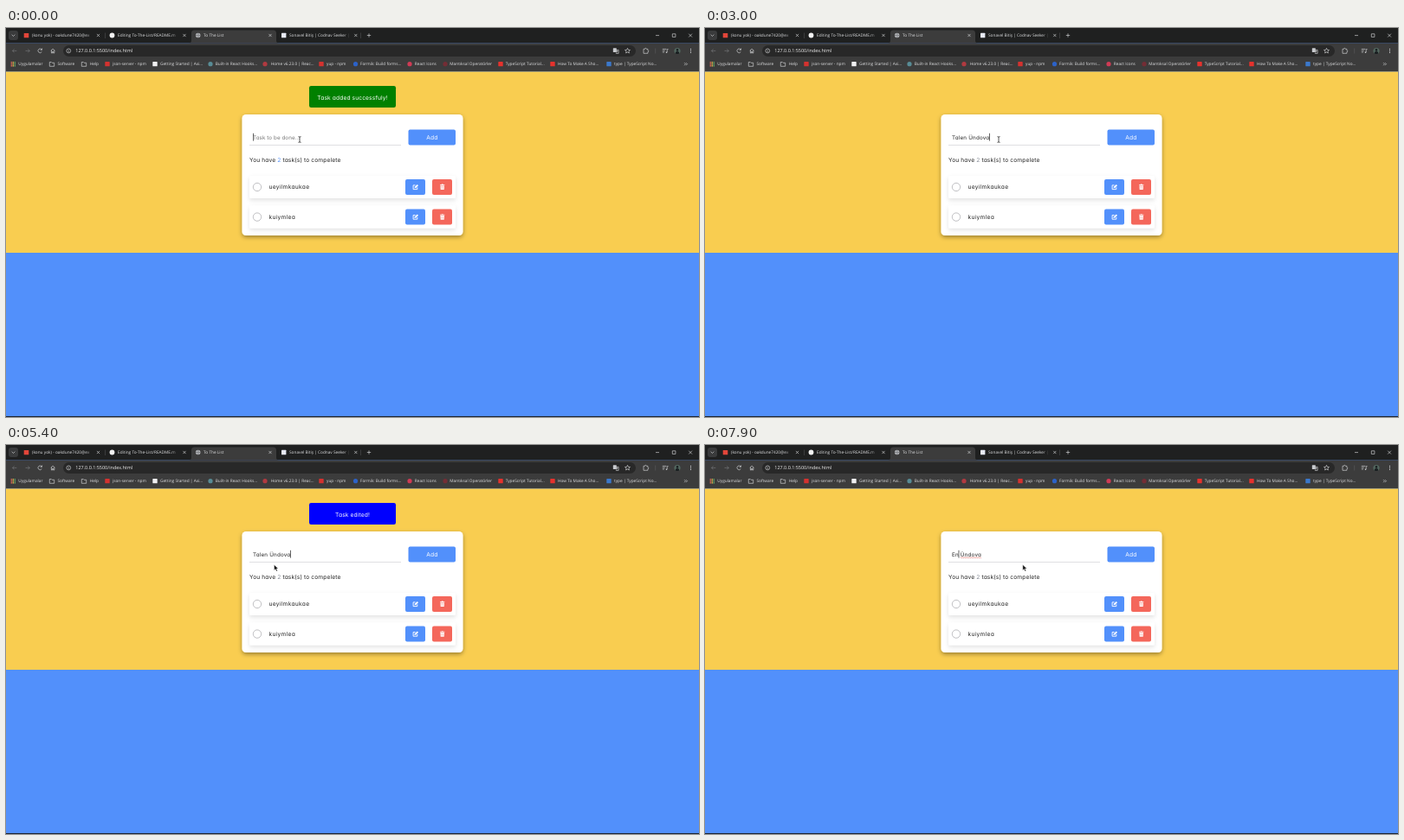
Recreate the animation shown at these times as an HTML page. Size 800 by 450 pixels, loop 8 s.

```html
<!DOCTYPE html>
<html lang="en">
<head>
<meta charset="utf-8">
<title>To The List</title>
<style>
html, body { margin: 0; width: 100%; height: 100%; overflow: hidden; background: #5290fb; }
svg { display: block; width: 100vw; height: 100vh; }
text { white-space: pre; text-rendering: geometricPrecision; }
.ui { font: 4.75px "Open Sans", "Noto Sans", sans-serif; fill: #dedfe1; }
.url { font-size: 5.45px; fill: #f0f0f0; }
.page { font: 6.67px Inter, "Open Sans", sans-serif; font-feature-settings: "cv11"; letter-spacing: .12px; fill: #252525; }
.item { letter-spacing: .28px; }
.field { font-size: 6.25px; letter-spacing: .2px; }
.hint { letter-spacing: .08px; fill: #777; }
.light { fill: #fff; }
.line { fill: none; stroke: #d6d7d9; stroke-width: .65; }
</style>
</head>
<body>
<svg id="stage" viewBox="0 0 800 450" preserveAspectRatio="none">
  <defs>
    <filter id="cardShadow" x="-10%" y="-10%" width="120%" height="125%">
      <feDropShadow dx="0" dy="2" stdDeviation="2.6" flood-color="#000" flood-opacity=".38"/>
    </filter>
    <filter id="rowShadow" x="-10%" y="-40%" width="120%" height="200%">
      <feDropShadow dx="0" dy="2.5" stdDeviation="2.6" flood-color="#000" flood-opacity=".11"/>
    </filter>
    <linearGradient id="fadeTab"><stop offset="0" stop-color="#1f2020" stop-opacity="0"/><stop offset="1" stop-color="#1f2020"/></linearGradient>
  </defs>
  <g id="browser"></g>
  <g id="page"></g>
</svg>
<script>
const LOOP = 8000, STEP = 100, BLUE = '#5290fb', RED = '#f4675b';
const TASK = 'Talen Ündova', SURNAME = ' Ündova';
const FIELD_X = 285;

const $ = id => document.getElementById(id);
function add(parent, tag, attrs = {}, text) {
  const el = document.createElementNS('http://www.w3.org/2000/svg', tag);
  for (const k in attrs) el.setAttribute(k, attrs[k]);
  if (text !== undefined) el.textContent = text;
  parent.appendChild(el);
  return el;
}
const box = (p, x, y, width, height, fill, rx = 0, more = {}) =>
  add(p, 'rect', { x, y, width, height, fill, rx, ...more });
const dot = (p, cx, cy, r, fill, more = {}) => add(p, 'circle', { cx, cy, r, fill, ...more });
const label = (p, x, y, str, cls, more = {}) => add(p, 'text', { x, y, class: cls, ...more }, str);
const line = (p, d, more = {}) => add(p, 'path', { d, class: 'line', ...more });
const show = (el, on) => el.setAttribute('visibility', on ? 'visible' : 'hidden');

function globe(p, x, y, r) {
  dot(p, x, y, r, '#c4c6c9');
  line(p, `M${x - r} ${y}h${2 * r}M${x} ${y - r}q${-r} ${r} 0 ${2 * r}q${r} ${-r} 0 ${-2 * r}`,
    { style: 'stroke:#55575b;stroke-width:.5' });
}

function drawTabs(g) {
  box(g, 0, 0, 800, 17.5, '#1f2020');
  box(g, 3, 3, 11, 11, '#3a3b3c', 3);
  line(g, 'M6.7 7.7l1.8 1.8l1.8-1.8');
  add(g, 'path', { d: 'M211 17.5q3 0 3-3V6q0-3.5 3.5-3.5h91q3.5 0 3.5 3.5v8.5q0 3 3 3z', fill: '#3c3c3c' });
  line(g, 'M114.5 5.5v6.5M409.5 5.5v6.5', { style: 'stroke:#4b4c4e' });

  box(g, 20.7, 6, 5.6, 5.2, '#e2463a', .5);
  dot(g, 122.5, 8.5, 2.9, '#f2f2f2');
  globe(g, 221.7, 8.5, 2.7);
  box(g, 318, 5.8, 5.4, 5.4, '#e8ebf6', .5);
  const tabs = [
    [30, '(konu yok) - oakdune7420@ex', 106.5],
    [129, 'Editing To-The-List/README.m', 206],
    [228, 'To The List', 305],
    [327, 'Sonavel Bitiş | Codnav Seeker | U', 403.8]
  ];
  tabs.forEach(([x, str, close], i) => {
    label(g, x, 10.3, str, 'ui');
    if (i !== 2) {
      box(g, x + 62, 4, 9, 9, 'url(#fadeTab)');
      box(g, x + 71, 4, 10, 9, '#1f2020');
    }
    line(g, `M${close - 1.6} 6.9l3.2 3.2m0-3.2l-3.2 3.2`);
  });
  line(g, 'M419 6.3v4.4M416.8 8.5h4.4');
  line(g, 'M750 8.6h4M769.3 6.8h3.6v3.6h-3.6zM788.2 6.7l3.8 3.8m0-3.8l-3.8 3.8');
}

function drawToolbar(g) {
  box(g, 0, 17.5, 800, 33, '#3c3c3c');
  box(g, 66, 20, 661, 13, '#282828', 6.5);
  line(g, 'M12.3 26.4h-4.8m2-2l-2 2l2 2M22.5 26.4h4.8m-2-2l2 2l-2 2', { style: 'stroke:#77797c' });
  line(g, 'M41.2 25a2.3 2.3 0 1 0 .1 2.5M41.5 23.5v1.8h-1.8');
  line(g, 'M51.8 26.2l2.3-2l2.3 2M52.4 25.8v3.2h1.2v-1.8h1v1.8h1.2v-3.2');
  dot(g, 72.3, 26.4, 2.4, 'none', { class: 'line' });
  line(g, 'M72.3 26v1.7M72.3 24.8v.5');
  label(g, 80.3, 28.3, '127.0.0.1:5500/index.html', 'ui url');

  box(g, 700.8, 23.3, 4, 4.6, '#c8cacd', .5);
  line(g, 'M703.5 25.4h3.6v4h-3.2M704.6 27h1.8m-.9-.6v.6q-.3 1-1 1.4');
  line(g, 'M717.5 23.4l.9 1.9l2.1.2l-1.6 1.4l.5 2.1l-1.9-1.1l-1.9 1.1l.5-2.1l-1.6-1.4l2.1-.2z');
  line(g, 'M736 24.3h1.5a.9 .9 0 0 1 1.8 0h1.6v1.6a.9 .9 0 0 1 0 1.8v1.6h-4.9z');
  line(g, 'M749.7 23.5v6', { style: 'stroke:#5a5b5e' });
  line(g, 'M757.8 24.4h4.6M757.8 26.2h3M757.8 28h2.2M763.2 28v-3.4h1.4');
  dot(g, 762.5, 28.2, .8, '#d6d7d9');
  dot(g, 775, 26.5, 3.6, '#53675f');
  add(g, 'path', { d: 'M772.6 29.2q.2-2.3 2.4-2.3t2.4 2.3q-2.4 1.8-4.8 0z', fill: '#191e20' });
  dot(g, 775, 25.4, 1.3, '#191e20');
  for (const y of [24.4, 26.4, 28.4]) dot(g, 790.5, y, .55, '#d6d7d9');
}

function drawBookmarks(g) {
  const gridColors = ['#e8675a', '#f0c04c', '#63ae6b'];
  for (let i = 0; i < 9; i++)
    box(g, 5.6 + i % 3 * 2, 39.1 + (i / 3 | 0) * 2, 1.4, 1.4, gridColors[i % 3]);
  const marks = [
    [8, 14.3, 'Uygulamalar'],
    [53, 59.5, 'Software', 'folder'],
    [90, 96.7, 'Help', 'folder'],
    [117, 123, 'json-server - npm', 'square', '#d4322f'],
    [172, 178, 'Getting Started | Axi...', 'square', '#f0f0f2'],
    [236, 241.8, 'Built-in React Hooks...', 'circle', '#588c96'],
    [299, 305.7, 'Home v6.23.0 | Reac...', 'circle', '#b13a40'],
    [364, 370, 'yup - npm', 'square', '#d4322f'],
    [403.5, 409, 'Formik: Build forms...', 'circle', '#2c62c8'],
    [466, 471.8, 'React Icons', 'circle', '#d03b55'],
    [507, 512.3, 'Mantıksal Operatörler', 'circle', '#742d35'],
    [571, 576.7, 'TypeScript Tutorial...', 'square', '#e5322d'],
    [631, 637, 'How To Make A Sho...', 'square', '#e5322d'],
    [696, 702, 'type | TypeScript No...', 'square', '#3b78cb']
  ];
  for (const [ix, x, str, kind, color] of marks) {
    if (kind === 'folder') line(g, `M${ix - 2.7} 39.5h2l.8 .8h2.6v4h-5.4z`);
    if (kind === 'square') box(g, ix - 2.7, 39.1, 5.4, 5.2, color, .6);
    if (kind === 'circle') dot(g, ix, 41.7, 2.6, color);
    label(g, x, 43.4, str, 'ui');
  }
  line(g, 'M783 40.2l1.5 1.5l-1.5 1.5M785 40.2l1.5 1.5l-1.5 1.5');
}

function drawRow(p, i, str) {
  const g = add(p, 'g', { transform: `translate(0 ${i * 34.6})` });
  box(g, 281, 171, 238, 26, '#fff', 2, { filter: 'url(#rowShadow)' });
  dot(g, 290, 184, 4.7, '#fff', { stroke: '#b9b9bd', 'stroke-width': .9 });
  label(g, 303.5, 186.3, str, 'page item');
  box(g, 461, 175, 23, 18, BLUE, 2);
  box(g, 492, 175, 23, 18, RED, 2);
  line(g, 'M472.6 181.9h-2.5v4.7h4.7v-2.3', { style: 'stroke:#fff;stroke-width:.9' });
  add(g, 'path', { d: 'M471.6 185.3l.3-1.6l2.8-2.8l1.3 1.3l-2.8 2.8z', fill: '#fff' });
  add(g, 'path', { d: 'M501 181.2h1.5l.5-.6h1.4l.5 .6h1.5v.8h-5.4zM501.4 182.4h4.6l-.3 4.7h-4z', fill: '#fff' });
  line(g, 'M502.8 183.3v2.8M504.6 183.3v2.8', { style: `stroke:${RED};stroke-width:.4` });
  return g;
}

drawTabs($('browser'));
drawToolbar($('browser'));
drawBookmarks($('browser'));

const page = $('page');
box(page, 0, 50.5, 800, 209.5, '#f9cd50');
box(page, 0, 260, 800, 189, BLUE);
box(page, 0, 449, 800, 1, '#1c2431');

const toast = add(page, 'g');
const toastBox = box(toast, 350, 67, 100, 25, '#008000', 2.2);
const toastText = label(toast, 400, 83, '', 'page light', { 'text-anchor': 'middle' });

const card = box(page, 272.5, 100, 255, 140, '#fff', 4.5, { filter: 'url(#cardShadow)' });
box(page, 281, 135, 175, .7, '#d2d2d6');
box(page, 464.5, 117.5, 54.5, 18, BLUE, 2);
label(page, 491.8, 129, 'Add', 'page light', { 'text-anchor': 'middle' });

const info = label(page, 281, 155.3, 'You have ', 'page');
const count = add(info, 'tspan', {}, '2');
add(info, 'tspan', {}, ' task(s) to compelete');

drawRow(page, 0, 'ueyilmkaukae');
drawRow(page, 1, 'kuiymlea');
const thirdRow = drawRow(page, 2, TASK);

const hint = label(page, FIELD_X, 128.5, 'Task to be done...', 'page field hint');
const mark = box(page, 0, 121.5, 0, 9.4, '#2a6bd2');
const field = label(page, FIELD_X, 128.5, '', 'page field');
const parts = ['#252525', '#fff', '#252525'].map(fill => add(field, 'tspan', { fill }));
const squiggle = line(page, '', { style: 'stroke:#e0443c;stroke-width:.55' });
const caret = box(page, 0, 121.8, .65, 8.8, '#111');

const beam = add(page, 'path', {
  d: 'M-1.5 -3.4q1.5 0 1.5 .8q0-.8 1.5-.8M0 -2.8v5.6M-1.5 3.4q1.5 0 1.5-.8q0 .8 1.5 .8',
  fill: 'none', stroke: '#222', 'stroke-width': .75
});
const arrow = add(page, 'path', {
  d: 'M0 0v6.4l1.5-1.3l1.1 2.5l1.2-.5l-1.1-2.5h2z',
  fill: '#111', stroke: '#fff', 'stroke-width': .4
});
const hand = add(page, 'path', {
  d: 'M-.6 .2q.6-.8 1.2 0v2.5l2.5 .6q.7 .3 .5 1.2l-.6 2.7h-3.6l-2-2.6q.2-1 1.2-.3l.8 .6z',
  fill: '#fff', stroke: '#111', 'stroke-width': .45
});

// Times in ms
const ADDED = 3500, EDITED = 4900, FOCUSED = 5800, TYPED_E = 6950, TYPED_N = 7450;
const TOAST_TIME = 1300, BLINK = 530;
const TYPE_FROM = 1500, TYPE_GAP = 125;

const path = [
  [0, 339, 129], [4050, 339, 129], [4600, 472, 252], [4950, 472, 252], [5350, 309.5, 138.5],
  [5450, 309.5, 138.5], [5700, 302.5, 126.5], [5900, 302.5, 126.5], [6300, 291.1, 126.5],
  [6500, 284.5, 126.5], [7000, 284.5, 126.5], [7400, 366.8, 138.5], [LOOP, 366.8, 138.5]
];
function pointer(t) {
  const i = Math.max(1, path.findIndex(k => k[0] > t));
  const [t0, x0, y0] = path[i - 1], [t1, x1, y1] = path[i];
  const u = (t - t0) / (t1 - t0), e = u * u * (3 - 2 * u);
  return [x0 + (x1 - x0) * e, y0 + (y1 - y0) * e];
}

function typed(t) {
  if (t >= TYPED_N) return 'En' + SURNAME;
  if (t >= TYPED_E) return 'E' + SURNAME;
  if (t >= EDITED) return TASK;
  if (t >= ADDED || t < TYPE_FROM) return '';
  return TASK.slice(0, 1 + Math.floor((t - TYPE_FROM) / TYPE_GAP));
}

// Left edge of the character with index n
const edge = n => FIELD_X + (n ? field.getSubStringLength(0, n) : 0);

function setParts(str, from, to) {
  [str.slice(0, from), str.slice(from, to), str.slice(to)].forEach((s, i) => parts[i].textContent = s);
}

function drawField(t, mx) {
  const str = typed(t);
  setParts(str, str.length, str.length);
  show(hint, !str);

  const selecting = t >= FOCUSED && t < TYPED_E;
  let from = 5;
  if (selecting) {
    while (from > 0 && mx < (edge(from - 1) + edge(from)) / 2) from--;
    const x = edge(from);
    mark.setAttribute('x', x);
    mark.setAttribute('width', edge(5) - x);
    setParts(str, from, 5);
  }
  const selected = selecting && from < 5;
  show(mark, selected);

  let at = str.length;
  if (t >= TYPED_E) at -= SURNAME.length;
  else if (selecting) at = 5;
  caret.setAttribute('x', edge(at) - (at ? .2 : 0));
  const lastKey = t >= TYPE_FROM && t < ADDED
    ? TYPE_FROM + TYPE_GAP * Math.min(TASK.length - 1, Math.floor((t - TYPE_FROM) / TYPE_GAP))
    : [TYPED_N, TYPED_E, FOCUSED, EDITED, ADDED, 0].find(k => t >= k);
  show(caret, !selected && Math.floor((t - lastKey) / BLINK) % 2 === 0);

  show(squiggle, t >= FOCUSED);
  if (t >= FOCUSED) {
    const x0 = edge(str.indexOf(' ') + 1), n = Math.round((edge(str.length) - x0) / 2);
    squiggle.setAttribute('d', `M${x0} 130.3` + 'q.5-.9 1 0t1 0'.repeat(n));
  }
}

function draw(t) {
  const [mx, my] = pointer(t);
  const three = t >= ADDED && t < EDITED;
  const green = t < 1200 || (t >= ADDED && t < ADDED + TOAST_TIME);
  const blue = t >= EDITED && t < EDITED + TOAST_TIME;

  show(toast, green || blue);
  toastBox.setAttribute('fill', blue ? '#0000fe' : '#008000');
  toastText.textContent = blue ? 'Task edited!' : 'Task added successfuly!';
  card.setAttribute('height', three ? 174.5 : 140);
  show(thirdRow, three);
  count.textContent = three ? '3' : '2';
  count.setAttribute('fill', green ? BLUE : '#858b96');
  drawField(t, mx);

  const overField = mx > 281 && mx < 456 && my > 117 && my < 135;
  const overButton = three && mx > 461 && mx < 484 && my > 244;
  const shape = overField || t >= FOCUSED && t < 7000 ? beam : overButton ? hand : arrow;
  for (const c of [beam, arrow, hand]) show(c, c === shape);
  shape.setAttribute('transform', `translate(${mx} ${my})`);
}

const start = performance.now();
function tick() {
  const t = (performance.now() - start) % LOOP;
  draw(Math.floor(t / STEP) * STEP);
  requestAnimationFrame(tick);
}
draw(0);
requestAnimationFrame(tick);
</script>
</body>
</html>
```
